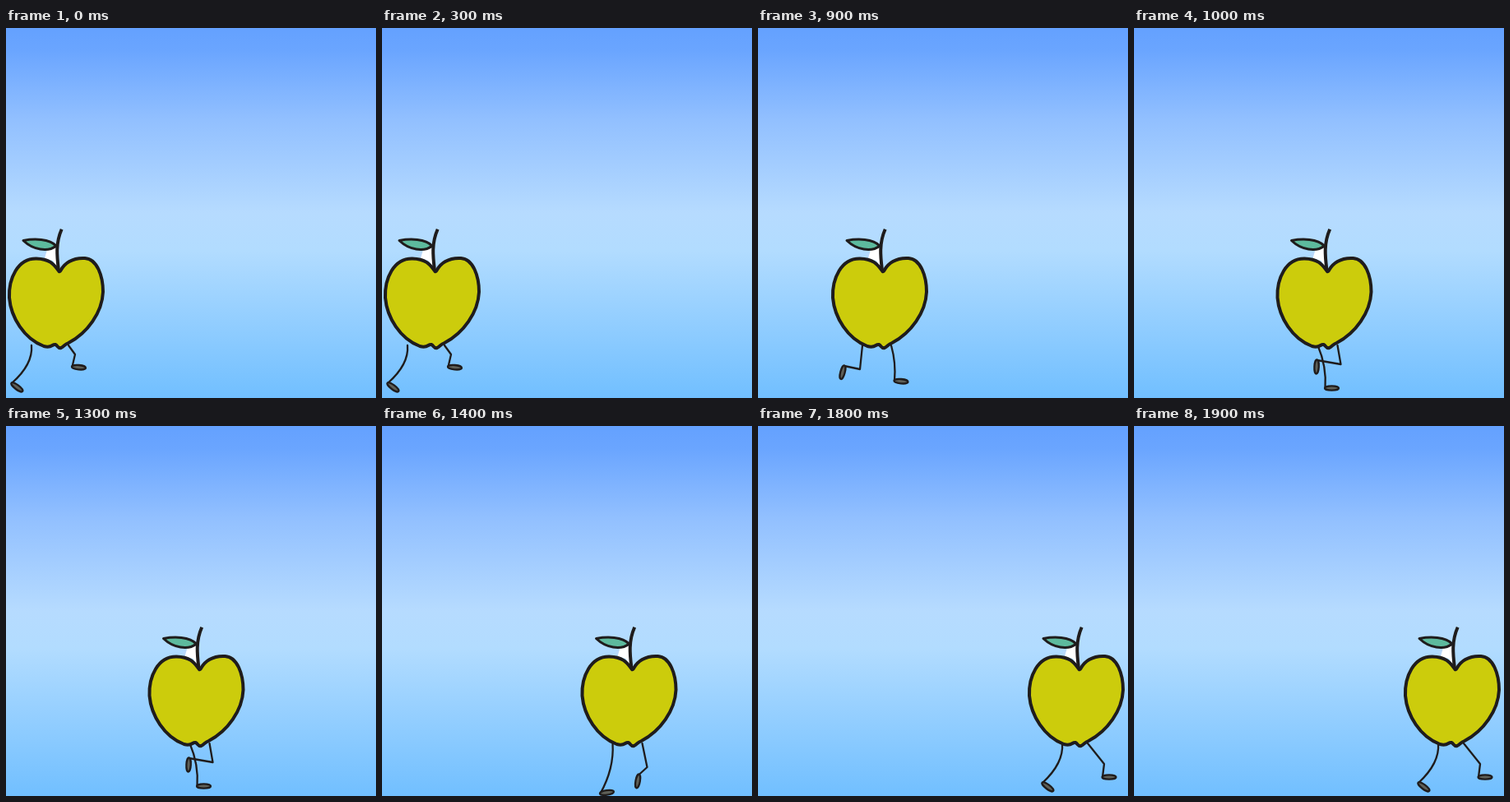
Recreate the animation shown at these times as an HTML page. Size 450 by 450 pixels, loop 2000 ms.

```html
<!DOCTYPE html>
<html lang="en">
<head>
<meta charset="utf-8">
<title>Walking apple</title>
<style>
html, body { margin: 0; width: 100%; height: 100%; overflow: hidden; }
svg { display: block; width: 100vw; height: 100vh; }
#walker { fill: none; stroke: #1f1c1c; stroke-width: 4; stroke-linejoin: round; }
#legs { fill: #5f6058; stroke-width: 2.3; stroke-linecap: round; }
</style>
</head>
<body>
<svg viewBox="0 0 450 450">
  <defs>
    <linearGradient id="sky" x2="0" y2="1">
      <stop offset="0" stop-color="#64a1ff"/>
      <stop offset=".06" stop-color="#6aa5ff"/>
      <stop offset=".25" stop-color="#92c0ff"/>
      <stop offset=".5" stop-color="#b6dbff"/>
      <stop offset=".6" stop-color="#b2dcff"/>
      <stop offset="1" stop-color="#71bfff"/>
    </linearGradient>
  </defs>
  <rect width="450" height="450" fill="url(#sky)"/>
  <g id="walker">
    <g id="legs"></g>
    <path stroke="none" fill="#b9d9fb" d="M49 271L44 276L49 281Z"/>
    <path stroke="none" fill="#fff" d="M50 270L62 267L63 292L57 283L47 280Z"/>
    <path fill="#cccc0c" d="M64.5 296C59 289 55 281 37 280.5C14 280 3 305 4 328C6 352 22 378 46 387C56 390 56 384 60 385C63 386 63 390 67 389C71 387 71 385 76 383C99 371 117 346 118 321C118 302 111 281 96 280C80 279 71 287 67 294Q65.5 297 64.5 296Z"/>
    <path d="M67.7 244.8C60 262 62 278 64 295"/>
    <path fill="#5dba9d" stroke-width="3" d="M21 258.5C34 256 53 256 61 265C51 273 33 270 21 258.5Z"/>
  </g>
</svg>
<script>
// Coordinates are relative to the apple, which stands at x from the start time on.
// straight: hip x, ankle x, ankle y, foot angle
// bent: hip x, knee x, knee y, ankle x, ankle y, foot angle
const poses = [
  { start: 0, x: 0, straight: [31, 7, 432, 37], bent: [76, 84, 397, 80.5, 412, 5] },
  { start: 400, x: 87, straight: [75, 79, 429, 5], bent: [40, 37, 415, 18, 411, 105] },
  { start: 1000, x: 170.5, straight: [53, 62, 438, 0], bent: [77, 81, 409, 52, 404, 93] },
  { start: 1400, x: 239.5, straight: [41, 26, 447, -8], bent: [77, 83, 415, 73, 424, 100] },
  { start: 1800, x: 326, straight: [44, 20, 434, 37], bent: [75, 95, 411, 93, 427, 0] }
];
const hipY = 386;
const walker = document.getElementById("walker");
const legs = document.getElementById("legs");

const limb = (line, x, y, angle) =>
  `<path fill="none" d="${line}"/>
   <ellipse cx="8" rx="8.5" ry="2.7" transform="translate(${x} ${y}) rotate(${angle})"/>`;

// The straight leg bows forwards, the bent one has a sharp knee.
function straightLeg([hip, x, y, angle]) {
  const bow = Math.max(hip, x) + 2;
  return limb(`M${hip} ${hipY}Q${bow} ${(hipY + y) / 2} ${x} ${y}`, x, y, angle);
}

function bentLeg([hip, kneeX, kneeY, x, y, angle]) {
  return limb(`M${hip} ${hipY}L${kneeX} ${kneeY}L${x} ${y}`, x, y, angle);
}

let shown;
function draw() {
  const time = performance.now() % 2000;
  const pose = poses.findLast(p => p.start <= time);
  if (pose !== shown) {
    shown = pose;
    walker.setAttribute("transform", `translate(${pose.x} 0)`);
    legs.innerHTML = straightLeg(pose.straight) + bentLeg(pose.bent);
  }
  requestAnimationFrame(draw);
}
draw();
</script>
</body>
</html>
```
